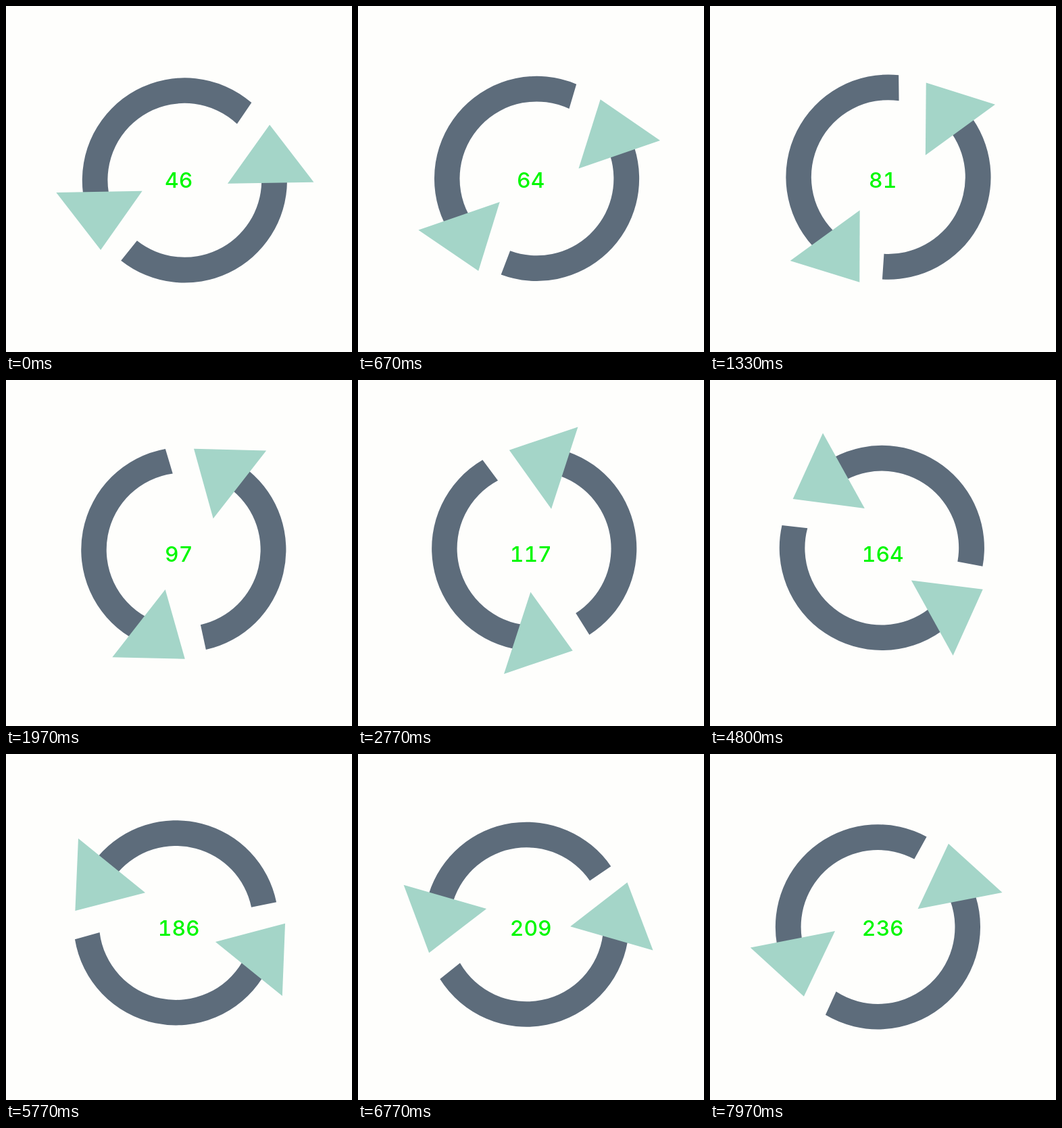
These frames come from a looping animation (512x512 px, 8000 ms). An HTML page:

```html
<!DOCTYPE html>
<html lang="en">
<head>
<meta charset="utf-8">
<title>Rotating arrows</title>
<style>
  html, body { margin: 0; width: 100%; height: 100%; overflow: hidden; background: #fefefc; }
  svg { display: block; width: 100vw; height: 100vh; }
  .arc { fill: #5d6c7b; }
  .head { fill: #a4d5c8; }
  text {
    font: 500 31.8px Inter, "DejaVu Sans", sans-serif;
    font-variant-numeric: tabular-nums;
    text-anchor: middle;
    fill: #00f800;
  }
</style>
</head>
<body>
<svg viewBox="0 0 512 512">
  <g id="arrows">
    <g transform="translate(1.8 -7.8)">
      <path class="arc" d="M4 -151.6A151.6 151.6 0 0 1 117.2 96.2L88.2 72A113.8 113.8 0 0 0 4 -113.8Z"/>
      <path class="arc" d="M17 150.6A151.6 151.6 0 0 1 -113 -101L-82 -79A113.8 113.8 0 0 0 17 112.6Z"/>
      <path class="head" d="M6.1 -191V-63.5L-80 -127.2Z"/>
      <path class="head" d="M14.9 63V190.3L101 126Z"/>
    </g>
  </g>
  <text id="label" x="255.7" y="268.5">46</text>
</svg>
<script>
  const LOOP = 8000;
  const DRAWN_AT = 135; // angle at which the arrows are drawn above
  const arrows = document.getElementById('arrows');
  const label = document.getElementById('label');

  // [time in ms, degrees]: the turn slows down slightly
  const pace = [[0, 46], [670, 64], [1970, 97], [3530, 135], [4820, 164], [6770, 209], [7970, 236], [8010, 237]];

  function angleAt(time) {
    const i = pace.findIndex(([t]) => t > time);
    const [t0, a0] = pace[i - 1];
    const [t1, a1] = pace[i];
    return Math.round(a0 + (a1 - a0) * (time - t0) / (t1 - t0));
  }

  function draw(now) {
    const angle = angleAt(now % LOOP);
    arrows.setAttribute('transform', `translate(256.5 256.2) rotate(${DRAWN_AT - angle})`);
    label.textContent = angle;
    requestAnimationFrame(draw);
  }

  draw(0);
</script>
</body>
</html>
```
